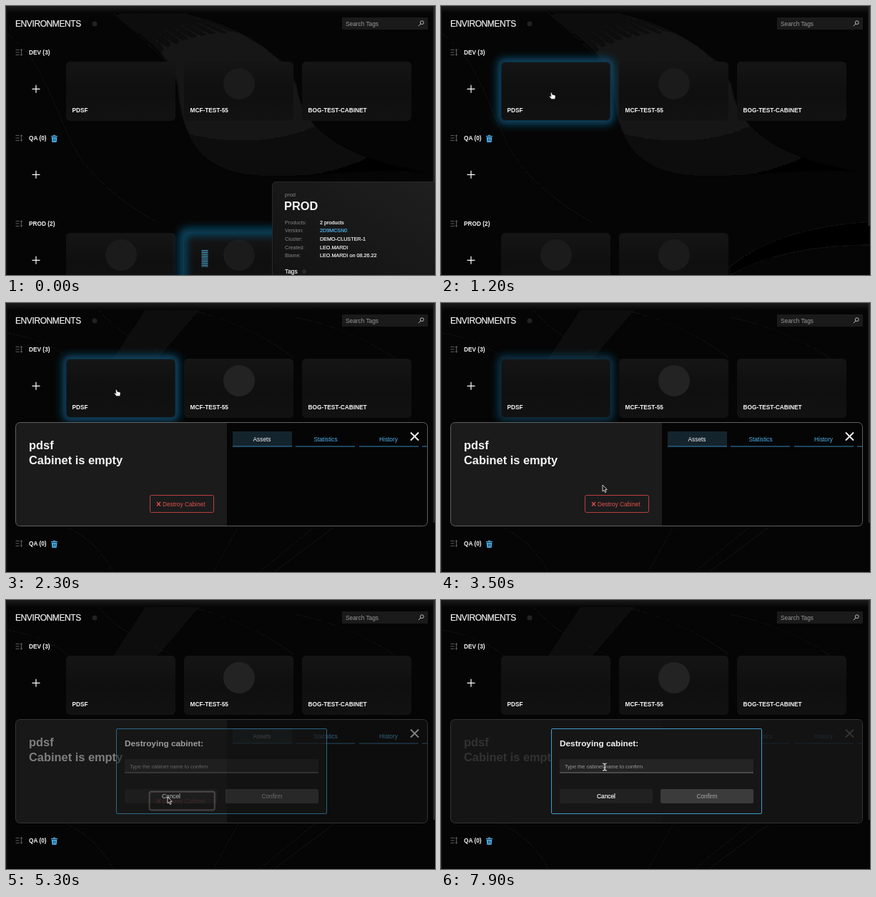
An HTML page that plays this animation: 600 by 377 pixels, repeating every 8 s.

```html
<!DOCTYPE html>
<html lang="en">
<head>
<meta charset="utf-8">
<title>Environments</title>
<style>
html, body { margin: 0; width: 100%; height: 100%; overflow: hidden; background: #050505; }
svg { display: block; width: 600px; height: 377px; font: 8.3px "Liberation Sans", Arial, sans-serif; fill: #f4f4f4; }
.title { font-size: 12px; letter-spacing: -.4px; }
.b { font-weight: bold; }
.big { font-weight: bold; font-size: 16.4px; }
.mid { text-anchor: middle; }
.small { font-size: 7.2px; }
.value { stroke: currentColor; stroke-width: .2; color: #f4f4f4; }
.dim { fill: #858585; }
.blue { fill: #4fb3ec; color: #4fb3ec; }
.line { fill: none; stroke: #fff; }
.sweep { fill: none; stroke: #181818; }
</style>
</head>
<body>
<svg viewBox="0 0 600 377">
  <defs>
    <linearGradient id="cardFill" x2="0" y2="1">
      <stop stop-color="#151515"/><stop offset=".5" stop-color="#0f0f0f"/><stop offset="1" stop-color="#121212"/>
    </linearGradient>
    <linearGradient id="topFill" x2="0" y2="1">
      <stop stop-color="#1b1b1b"/><stop offset="1" stop-color="#050505"/>
    </linearGradient>
    <linearGradient id="infoFill" x1="1" x2="0" y2="1">
      <stop stop-color="#1f1f1f"/><stop offset=".6" stop-color="#171717"/><stop offset="1" stop-color="#131313"/>
    </linearGradient>
    <radialGradient id="wing" cx=".4" cy=".45" r=".6">
      <stop stop-color="#1a1a1a"/><stop offset=".6" stop-color="#111"/><stop offset="1" stop-color="#060606"/>
    </radialGradient>
    <filter id="soft"><feGaussianBlur stdDeviation="1.2"/></filter>
    <filter id="halo" x="-20%" y="-30%" width="140%" height="160%"><feGaussianBlur stdDeviation="6"/></filter>
    <g id="trash" class="blue">
      <path d="M-4.5 -4h9v1.3h-9zM-1.7 -5.3h3.4v1h-3.4zM-3.8 -2h7.6l-.7 7h-6.2z"/>
      <path class="line" style="stroke:#0b3144" d="M-1.2 -.7v4.2M1.2 -.7v4.2"/>
    </g>
    <g id="sort" fill="none" stroke="#5c5c5c">
      <path d="M-4.5 -3.5h5M-4.5 0h5M-4.5 3.5h5M3.5 -4v8M2 -2.5l1.5 -2 1.5 2M2 2.5l1.5 2 1.5 -2"/>
    </g>
    <path id="plus" class="line" stroke-width="1.2" d="M-5.5 0h11M0 -5.5v11"/>
  </defs>

  <rect width="600" height="377" fill="#050505"/>
  <g filter="url(#soft)">
    <g id="bgHome">
      <path fill="url(#wing)" d="M150 10C195 45 232 70 240 110C246 185 270 225 335 236C420 246 510 222 600 235C480 215 415 180 406 110C385 65 330 30 250 10Z"/>
      <g id="strands"></g>
      <path class="sweep" d="M0 38C58 75 72 170 110 222Q150 270 215 305"/>
      <path fill="#020202" stroke="#181818" d="M403 366Q470 310 600 302V335Q480 335 405 377Z"/>
    </g>
    <g id="bgOpen">
      <path fill="#0e0e0e" d="M196 8H272L212 78H150Z"/>
      <path class="sweep" d="M128 8Q160 50 238 78M0 42Q55 50 88 78M250 8Q340 28 404 78M404 20Q480 35 545 78"/>
      <path class="sweep" d="M80 312Q125 330 150 377M290 377L325 313M355 377L432 313M375 377L460 313"/>
    </g>
  </g>
  <rect width="600" height="10" fill="url(#topFill)"/>
  <path fill="#171717" d="M0 0h1.5v377H0z"/>
  <rect x="597.5" width="2.5" height="308" fill="#292929"/>

  <text class="title value" x="13" y="29">ENVIRONMENTS</text>
  <circle cx="124" cy="25" r="3.5" fill="#222"/>
  <rect x="470" y="16" width="120" height="17" fill="#1a1a1a"/>
  <text x="475" y="27.5" fill="#999">Search Tags</text>
  <g class="line" style="stroke:#bbb"><circle cx="581.8" cy="23.2" r="2.4"/><path d="M580 25l-3.2 3.2"/></g>

  <g id="rows"></g>

  <g id="info">
    <rect x="247" y="316" width="157" height="87" rx="8" fill="none" stroke="#0b5478" stroke-width="9" filter="url(#halo)"/>
    <path class="line" style="stroke:#0d3a50" d="M248.5 377V325Q249 318 256 317.5H372"/>
    <path stroke="#3f86a6" stroke-width="9" stroke-dasharray="1.6 1" d="M278 342v24"/>
    <path fill="url(#infoFill)" stroke="#282828" d="M372.5 378V252.5Q372.5 246.5 378.5 246.5H601V378Z"/>
    <text class="dim" x="390" y="267" font-size="7.5">prod</text>
    <text class="big" x="389" y="286">PROD</text>
    <g id="facts" class="small"></g>
    <text class="value" x="390" y="375">Tags</text>
    <circle cx="417" cy="372" r="3" fill="#2a2a2a"/>
  </g>

  <g id="detail">
    <rect x="13.5" y="167.5" width="576" height="145" rx="6" fill="#050505"/>
    <path fill="#1b1b1c" d="M309 168H19q-5 0-5 5v134q0 5 5 5H309z"/>
    <text class="big" x="32" y="205">pdsf</text>
    <text class="big" x="32" y="226">Cabinet is empty</text>
    <rect x="317" y="180" width="83" height="21" fill="#14242d"/>
    <path class="line" style="stroke:#3487b8" d="M317 201h83M405 201h83M494 201h83M582 201h7"/>
    <g class="mid">
      <text x="358" y="193.5">Assets</text>
      <text class="blue" x="447" y="193.5">Statistics</text>
      <text class="blue" x="535" y="193.5">History</text>
    </g>
    <path class="line" stroke-width="1.8" d="M566 181.5l11 11M577 181.5l-11 11"/>
    <rect id="destroy" x="201.5" y="269.5" width="89" height="24" rx="2" stroke="#b9403d"/>
    <rect id="focus" class="line" x="200.5" y="268.5" width="91.5" height="26" rx="3" stroke-width="1.8"/>
    <g fill="#e0524e"><path stroke="#e0524e" stroke-width="1.2" d="M211 279l5 5.5M216 279l-5 5.5"/><text x="219" y="285">Destroy Cabinet</text></g>
    <rect id="veil" x="14" y="168" width="575" height="144" rx="6" fill="#151515"/>
    <rect id="frame" class="line" x="13.5" y="167.5" width="576" height="145" rx="6"/>
  </g>

  <g id="modal">
    <rect x="154.5" y="180.5" width="294" height="119" rx="1.5" fill="#161616" stroke="#3d9bcb"/>
    <text class="b" x="166" y="205" font-size="11.8">Destroying cabinet:</text>
    <rect x="166" y="223" width="271" height="19" fill="#242424"/>
    <path class="line" style="stroke:#777" d="M166 242h271"/>
    <text x="173" y="235.5" font-size="7.4" fill="#999">Type the cabinet name to confirm</text>
    <rect x="166" y="265" width="130" height="20" rx="2" fill="#212121"/>
    <rect x="307" y="265" width="130" height="20" rx="2" fill="#3b3b3b"/>
    <text class="mid value" x="231" y="278">Cancel</text>
    <text class="mid" x="372" y="278" fill="#aaa">Confirm</text>
  </g>

  <g id="pointer">
    <path id="hand" fill="#fff" stroke="#222" stroke-width=".7" d="M-1.7 -4.5q1-.8 1.6.3l1 2.4 3.2.7q1.3.4 1 1.8l-.7 3.8h-5l-3-3.7q.2-1.2 1.6-.5l.9.6z"/>
    <path id="arrow" fill="#111" stroke="#ddd" stroke-width=".9" d="M-2 -5v9l2-1.8 1.5 3.3 1.5-.7-1.5-3.2h2.8z"/>
    <path id="beam" fill="none" stroke="#ddd" stroke-width="1.2" d="M-3 -5q3 0 3 2 0-2 3-2M0 -4v8M-3 5q3 0 3-2 0 2 3 2M-1.5 1h3"/>
  </g>
</svg>
<script>
const $ = id => document.getElementById(id);
const LOOP = 8000;

const card = (name, i, y, logo) => {
  const x = 84 + 165 * i;
  return `<rect x="${x}" y="${y}" width="153" height="83" rx="6" fill="url(#cardFill)"/>
    ${logo ? `<circle class="logo" cx="${x + 77}" cy="${y + 31}" r="22"/>` : ''}
    <text class="b" x="${x + 8.5}" y="${y + 71}">${name}</text>`;
};
const row = (id, title, y, cards) => `<g id="${id}">
  <use href="#sort" x="18" y="${y}"/><text class="b" x="32" y="${y + 3.3}">${title}</text>
  <use href="#plus" x="42" y="${y + 51.3}"/>${cards}</g>`;

$('rows').innerHTML =
  row('dev', 'DEV (3)', 65,
    `<g id="glow"><rect x="79" y="73" width="163" height="93" rx="9" fill="#084a69" filter="url(#halo)"/></g>` +
    card('PDSF', 0, 78) + card('MCF-TEST-55', 1, 78, true) + card('BOG-TEST-CABINET', 2, 78) +
    `<rect id="edge" class="line" x="84" y="78.5" width="153" height="82" rx="6" style="stroke:#0b3345"/>`) +
  `<g id="lower">${row('qa', 'QA (0)', 185, '<use href="#trash" x="67.5" y="186"/>')}
  ${row('prod', 'PROD (2)', 305, card('', 0, 318, true) + card('', 1, 318, true))}</g>`;

$('facts').innerHTML = [
  ['Products', '2 products'], ['Version', '2D9MCSN0', 'blue'], ['Cluster', 'DEMO-CLUSTER-1'],
  ['Created', 'LEO.MARDI'], ['Blame', 'LEO.MARDI on 08.26.22']
].map(([key, value, cls = ''], i) => {
  const y = 305.5 + 11.7 * i;
  return `<text class="dim" x="390" y="${y}">${key}:</text><text class="value ${cls}" x="439" y="${y}">${value}</text>`;
}).join('');

// Fine strands that fan out from the top and gather to the right
$('strands').innerHTML = Array.from({ length: 9 }, (_, i) =>
  `<path class="sweep" d="M${150 + 12 * i} 10Q${200 + 15 * i} ${50 - 2 * i} ${245 + 19 * i} ${100 - 2 * i}"/>`).join('');

const logos = document.querySelectorAll('.logo');
const ramp = (t, a, b) => Math.min(1, Math.max(0, (t - a) / (b - a)));
const ease = (t, a, b) => { const p = ramp(t, a, b); return p * p * (3 - 2 * p); };
const show = (id, on) => $(id).style.opacity = +on;

function render(t) {
  const open = t >= 2200;
  const glow = ramp(t, 80, 200) * (1 - ramp(t, 3200, 4100));
  const toButton = ease(t, 2900, 3450);
  const press = ease(t, 4600, 4900);
  const toInput = ease(t, 5500, 6200);
  const dim = ramp(t, 5150, 5400);
  const x = 155 + 73 * toButton + toInput;
  const y = 126 + 134 * toButton + 21 * press - 47 * toInput;

  show('info', 1 - ramp(t, 80, 200));
  show('bgHome', !open);
  show('bgOpen', open);
  show('detail', open);
  show('glow', glow);
  show('edge', glow);
  $('lower').setAttribute('transform', `translate(0 ${open ? 152 : 0})`);
  logos.forEach(c => c.setAttribute('fill', open ? '#232323' : '#1b1b1b'));

  const overButton = y > 269 && !dim;
  $('destroy').setAttribute('fill', overButton ? '#371f21' : '#1b1b1c');
  show('focus', t >= 4900);
  show('veil', dim * .87);
  $('frame').style.stroke = dim > .5 ? '#353535' : '#606060';
  show('modal', dim);

  const beam = toInput > .7;
  const arrow = !beam && (dim > 0 || toButton > .2 && !overButton);
  show('pointer', t >= 200);
  show('beam', beam);
  show('arrow', arrow);
  show('hand', !beam && !arrow);
  $('pointer').setAttribute('transform', `translate(${x} ${y})`);
}

const start = performance.now();
function tick() {
  render((performance.now() - start) % LOOP);
  requestAnimationFrame(tick);
}
tick();
</script>
</body>
</html>
```
